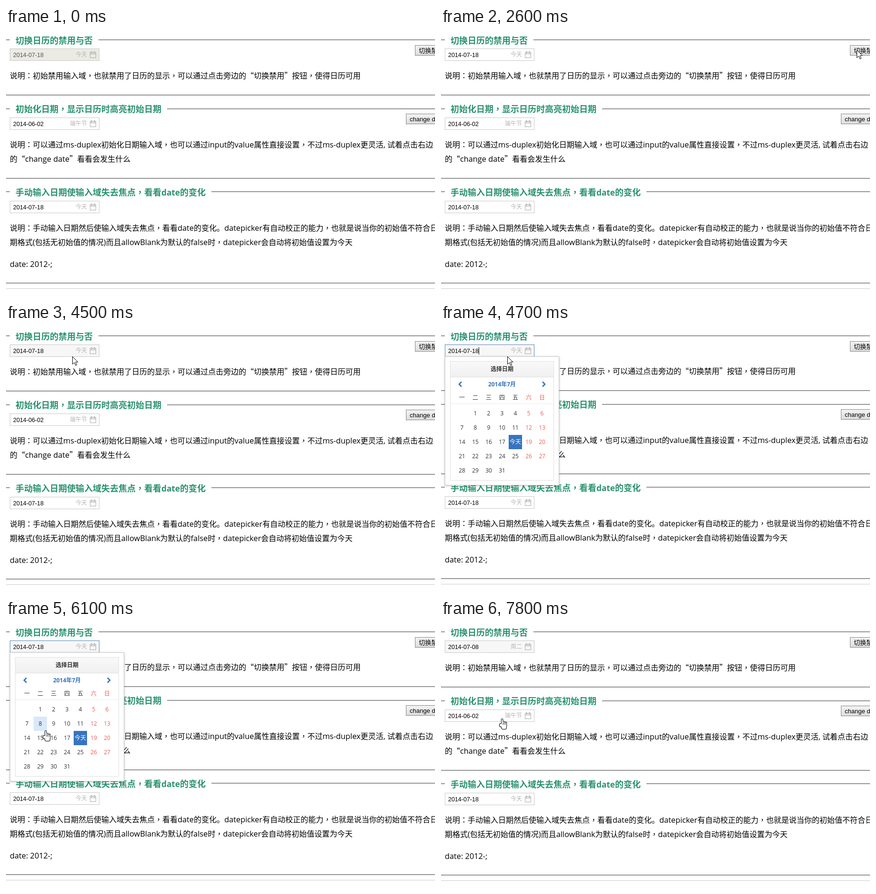
Write an HTML page with a canvas that moves like this. It is 900x563 px and loops after 8000 ms.

```html
<!DOCTYPE html>
<html lang="zh-CN">
<head>
<meta charset="utf-8">
<title>日历</title>
<style>
html, body { margin: 0; width: 100%; height: 100%; overflow: hidden; background: #fff; }
canvas { display: block; }
</style>
</head>
<body>
<canvas id="stage" width="900" height="563"></canvas>
<script>
const ctx = document.getElementById('stage').getContext('2d');
const LOOP = 8000, STEP = 100;
const CJK = '"Noto Sans CJK SC", "Noto Sans CJK", "Noto Sans CJK JP", sans-serif';
const CENTERED = '"Noto Sans CJK TC", ' + CJK; // commas and colons in mid-cell
const LATIN = '"Open Sans", "Noto Sans", sans-serif';
const ARIAL = '"Liberation Sans", Arial, sans-serif';
const GREEN = '#2a9270', BLUE = '#3674c0', RED = '#f25c54', INK = '#333';

const APPEAR = 300, FOCUS = 4500, OPEN = 4700, PICK = 6300;
const CLICKS = [
  { down: 1000, up: 1100 }, { down: 1800, up: 2000 }, { down: 2500, up: 2600 },
  { down: 3300, up: 3400 }, { down: 4000, up: 4200 }
];
const ENTRY = { x: 887, y: 43 };
const MOVES = [
  { from: 200, to: 700, x: 872, y: 46 },
  { from: 4100, to: 4500, x: 139, y: 68 },
  { from: 4700, to: 5100, x: 122, y: 216 },
  { from: 5100, to: 5400, x: 90, y: 241 },
  { from: 5400, to: 5700, x: 82, y: 232 },
  { from: 6300, to: 6800, x: 878, y: 165 },
  { from: 6800, to: 7200, x: 863, y: 198 },
  { from: 7300, to: 7600, x: 127, y: 207 }
];

function pointerAt(t) {
  let { x, y } = ENTRY;
  for (const m of MOVES) {
    const k = Math.min(1, Math.max(0, (t - m.from) / (m.to - m.from)));
    const e = k * k * (3 - 2 * k);
    x += (m.x - x) * e;
    y += (m.y - y) * e;
  }
  return { x: Math.round(x), y: Math.round(y) };
}

function rect(x, y, w, h, fill, stroke) {
  if (fill) { ctx.fillStyle = fill; ctx.fillRect(x, y, w, h); }
  if (stroke) {
    ctx.strokeStyle = stroke;
    ctx.lineWidth = 1;
    ctx.strokeRect(x + 0.5, y + 0.5, w - 1, h - 1);
  }
}

function shade(x, y, w, h, top, bottom) {
  const g = ctx.createLinearGradient(0, y, 0, y + h);
  g.addColorStop(0, top);
  g.addColorStop(1, bottom);
  rect(x, y, w, h, g);
}

// Sets mixed text: Latin, Chinese and its commas each get their own face.
function text(s, x, y, size, color, { bold = false, center = false, latin = LATIN, scale = 1 } = {}) {
  const weight = bold ? 'bold ' : '';
  const runs = s.match(/[\x20-\x7e]+|[，：]+|[^\x20-\x7e，：]+/g).map(run => {
    const font = weight + (run < '\x7f' ? `${size * scale}px ${latin}`
      : `${size}px ${/[，：]/.test(run) ? CENTERED : CJK}`);
    ctx.font = font;
    return { run, font, width: ctx.measureText(run).width };
  });
  if (center) x -= runs.reduce((sum, r) => sum + r.width, 0) / 2;
  ctx.fillStyle = color;
  for (const r of runs) {
    ctx.font = r.font;
    ctx.fillText(r.run, x, y);
    x += r.width;
  }
}

const title = (s, y) => text(s, 20, y, 18, GREEN, { bold: true, scale: 0.96 });
const body = (s, y) => text(s, 8, y, 16, '#000', { scale: 1.02 });

function groove(y, gapEnd = 8) {
  ['#757575', '#b8b8b8'].forEach((color, i) => {
    rect(0, y + i, 8, 1, color);
    rect(gapEnd, y + i, 900 - gapEnd, 1, color);
  });
}

function calendarIcon(x, y) {
  const c = '#aaa';
  rect(x, y + 2, 13, 12, null, c);
  rect(x, y + 5, 13, 1, c);
  for (const dx of [2, 8]) rect(x + dx, y, 3, 4, '#fff', c);
}

function field(y, date, label, { bg = '#fff', ink = '#000', border = '#c8c8c8' } = {}) {
  rect(8, y, 188, 26, bg, border);
  text(date, 15, y + 18, 12.5, ink, { latin: ARIAL });
  text(label, 170 - label.length * 12, y + 17, 12, '#b5b5b5');
  calendarIcon(176, y + 6);
}

function button(x, y, label, pressed) {
  shade(x, y, 90, 22, pressed ? '#eee' : '#f4f4f4', pressed ? '#e2e2e2' : '#dcdcdc');
  rect(x, y, 90, 22, null, '#858585');
  text(label, x + 8, y + 16, 13, '#000', { latin: ARIAL });
}

function chevron(x, dir) {
  ctx.beginPath();
  for (const k of [-1, 0, 1]) ctx.lineTo(x + dir * (2.5 - 5 * Math.abs(k)), 126.5 + 5 * k);
  ctx.strokeStyle = BLUE;
  ctx.lineWidth = 2.6;
  ctx.stroke();
}

function picker(p) {
  ctx.save();
  ctx.shadowColor = 'rgba(0,0,0,.25)';
  ctx.shadowBlur = 4;
  ctx.shadowOffsetY = 1;
  rect(8, 68, 240, 271, '#fff');
  ctx.restore();
  rect(8, 68, 240, 271, null, '#c9c9c9');
  rect(19, 78, 218, 251, null, '#dfdfdf');
  shade(20, 79, 216, 32, '#f9f9f9', '#f0f0f0');
  rect(20, 111, 216, 1, '#dfdfdf');
  text('选择日期', 128, 99, 12, INK, { bold: true, center: true });
  text('2014年7月', 128, 131, 12, BLUE, { bold: true, center: true });
  chevron(40.5, -1);
  chevron(215.5, 1);
  [...'一二三四五六日'].forEach((d, i) =>
    text(d, 44 + 28 * i, 159, 12, i > 4 ? RED : INK, { center: true }));
  rect(20, 167, 216, 1, '#ececec');

  const hotCol = Math.floor((p.x - 30) / 28), hotRow = Math.floor((p.y - 173) / 30);
  for (let day = 1; day <= 31; day++) {
    const col = day % 7, row = Math.floor(day / 7);
    const x = 30 + 28 * col, y = 173 + 30 * row, today = day === 18;
    if (today) rect(x, y, 28, 30, BLUE);
    else if (col === hotCol && row === hotRow) rect(x, y, 28, 30, '#d9e8fb');
    text(today ? '今天' : String(day), x + 14, y + 19, 12,
      today ? '#fff' : col > 4 ? RED : INK, { center: true });
  }
}

function arrow() {
  const outline = new Path2D('M.5 .5V16.5L4.5 13L7 19L9.5 18L7 12H12Z');
  ctx.lineWidth = 1;
  ctx.fill(outline);
  ctx.stroke(outline);
}

// A palm, a thumb and four fingers; the fills hide the inner outlines.
function hand() {
  const shape = new Path2D();
  shape.roundRect(0, 10, 10, 12, 3);
  shape.roundRect(-4, 11, 5, 6, 2);
  for (let i = 0; i < 4; i++) {
    const top = i ? 6 + i * 0.6 : 1;
    shape.roundRect(i * 2.6, top, 2.6, 17 - top, 1.2);
  }
  ctx.lineWidth = 2;
  ctx.stroke(shape);
  ctx.fill(shape);
  for (let i = 1; i < 4; i++) rect(i * 2.6, 8, 0.8, 5, '#000');
}

function pointer(p, cursor) {
  ctx.save();
  ctx.translate(p.x, p.y);
  ctx.fillStyle = '#fff';
  ctx.strokeStyle = '#000';
  cursor();
  ctx.restore();
}

function draw(t) {
  const open = t >= OPEN && t < PICK, picked = t >= PICK;
  const enabled = CLICKS.filter(c => t >= c.up).length % 2 === 1;
  const pressed = CLICKS.some(c => t >= c.down && t < c.up);
  const p = pointerAt(t);

  rect(0, 0, 900, 563, '#fff');
  groove(24, 194);
  title('切换日历的禁用与否', 33);
  field(43, picked ? '2014-07-08' : '2014-07-18', picked ? '周二' : '今天',
    !enabled ? { bg: '#ebebe4', ink: '#545454' } :
    { bg: t < FOCUS ? '#fff' : '#f7f7f7', border: open ? '#5b86b8' : '#c8c8c8' });
  if (open && (t - 4600) % 1000 < 500) rect(79, 49, 1, 15, '#000');
  button(858, 36, '切换禁用', pressed);

  ctx.save();
  if (open) ctx.translate(0, -1);
  body('说明：初始禁用输入域，也就禁用了日历的显示，可以通过点击旁边的“切换禁用”按钮，使得日历可用', 106);
  groove(140);

  groove(169, 338);
  title('初始化日期，显示日历时高亮初始日期', 177);
  field(188, '2014-06-02', '端午节');
  button(839, 180, 'change date', false);
  body('说明：可以通过ms-duplex初始化日期输入域，也可以通过input的value属性直接设置，不过ms-duplex更灵活, 试着点击右边', 251);
  body('的“change date”看看会发生什么', 281);
  groove(315);

  groove(343, 431);
  title('手动输入日期使输入域失去焦点，看看date的变化', 352);
  field(363, '2014-07-18', '今天');
  body('说明：手动输入日期然后使输入域失去焦点，看看date的变化。datepicker有自动校正的能力，也就是说当你的初始值不符合日', 426);
  body('期格式(包括无初始值的情况)而且allowBlank为默认的false时，datepicker会自动将初始值设置为今天', 456);
  body('date: 2012-;', 502);
  groove(535);
  rect(0, 547, 900, 1, '#ccc');
  ctx.restore();

  if (open) picker(p);
  const overCell = open && p.y > 173, overLabel = t >= 7600;
  if (t >= APPEAR) pointer(p, overCell || overLabel ? hand : arrow);
}

const start = performance.now();
function tick() {
  const t = (performance.now() - start) % LOOP;
  draw(Math.floor(t / STEP) * STEP);
  requestAnimationFrame(tick);
}
tick();
</script>
</body>
</html>
```
